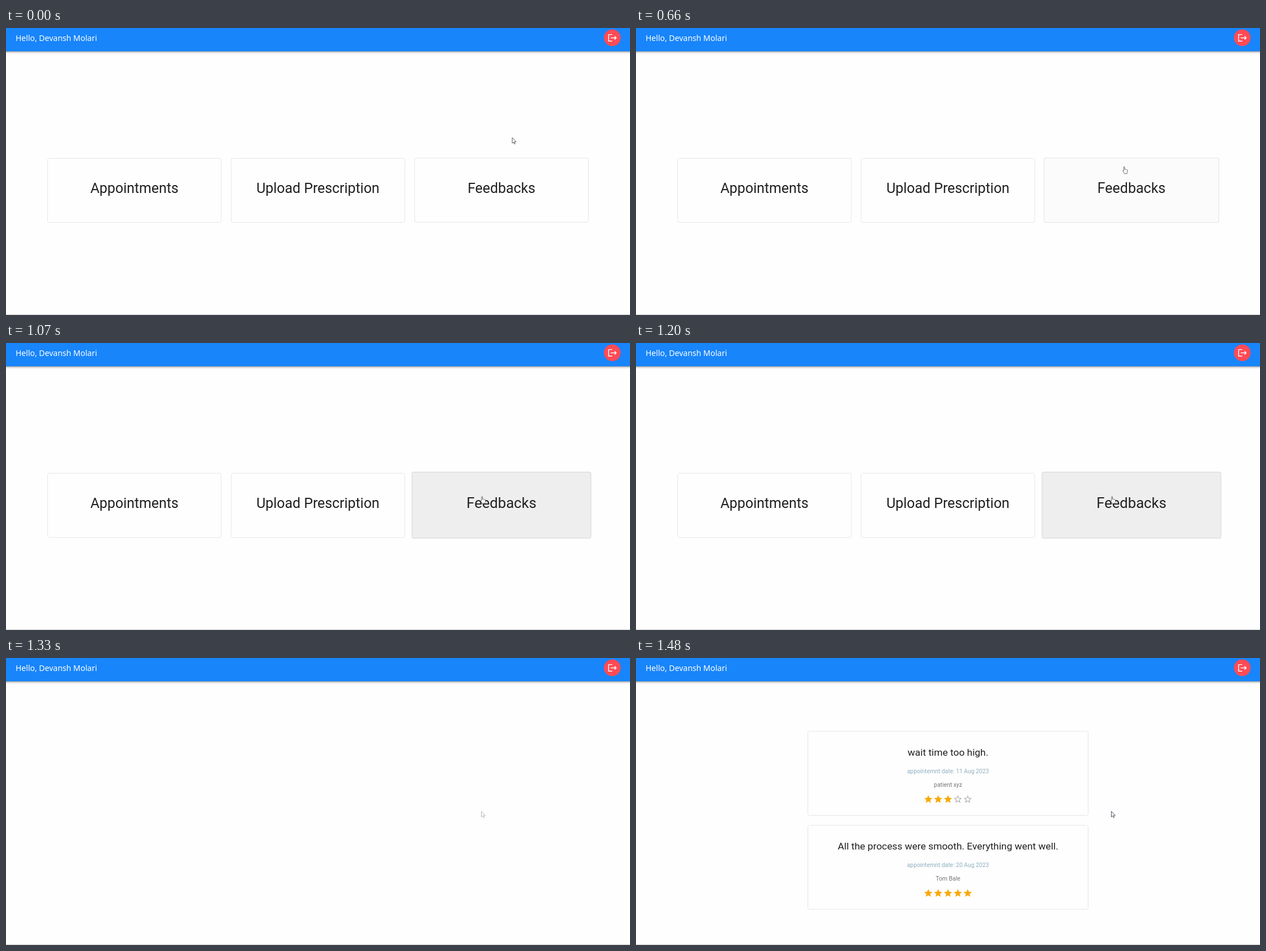
An HTML page that plays this animation: 1102x508 px, repeating every 1.87 s.

```html
<!DOCTYPE html>
<html lang="en">
<head>
<meta charset="utf-8">
<title>Clinic dashboard</title>
<style>
  html, body { margin: 0; width: 100%; height: 100%; overflow: hidden; background: #fefefe; }
  svg { display: block; width: 1102px; height: 508px; }
  text { font-family: Roboto, sans-serif; text-anchor: middle; fill: #212121; }
  .hello { font: 14px "Noto Sans", sans-serif; text-anchor: start; fill: #fff; }
  .tile { font-size: 24.85px; }
  .title { font-size: 17.35px; }
  .date { font-size: 10.35px; fill: #8fafbf; }
  .who { font-size: 10.4px; fill: #757575; }
  .box { fill: #fefefe; stroke: #e6e6e6; }
</style>
</head>
<body>
<svg viewBox="0 0 1102 508" xmlns="http://www.w3.org/2000/svg">
  <defs>
    <linearGradient id="shade" x2="0" y2="1">
      <stop offset="0" stop-color="#000" stop-opacity=".42"/>
      <stop offset=".4" stop-color="#000" stop-opacity=".14"/>
      <stop offset="1" stop-color="#000" stop-opacity="0"/>
    </linearGradient>
    <radialGradient id="veil" gradientUnits="userSpaceOnUse" cx="551" cy="254" r="607">
      <stop offset="0" stop-color="#fff" stop-opacity=".46"/>
      <stop offset="1" stop-color="#b8b8b8" stop-opacity=".27"/>
    </radialGradient>
    <path id="star" d="M12 17.27L18.18 21l-1.64-7.03L22 9.24l-7.19-.61L12 2 9.19 8.63 2 9.24l5.46 4.73L5.82 21z"/>
    <path id="hollow" fill-rule="evenodd" d="M22 9.24l-7.19-.62L12 2 9.19 8.63 2 9.24l5.46 4.73L5.82 21 12 17.27 18.18 21l-1.63-7.03zM12 15.4l-3.76 2.27 1-4.28-3.32-2.88 4.38-.38L12 6.1l1.71 4.04 4.38.38-3.32 2.88 1 4.28z"/>
  </defs>

  <rect width="1102" height="508" fill="#fefefe"/>
  <rect y="41" width="1102" height="5" fill="url(#shade)"/>
  <rect width="1102" height="41.2" fill="#1885fb"/>
  <text class="hello" x="17" y="22.8">Hello, Devansh Molari</text>
  <circle cx="1070.7" cy="17.3" r="14.8" fill="#ff4b55"/>
  <path d="M1070.6 11.6h-6.3v11.6h6.3M1067.8 17.4h9.6M1074.6 14.4l3 3-3 3" fill="none" stroke="#fff" stroke-width="1.45"/>

  <g id="menu"></g>
  <g id="reviews"></g>
  <rect y="507" width="1102" height="1" fill="#c9c9c9"/>
  <g id="loader">
    <rect width="1102" height="508" fill="url(#veil)"/>
    <g id="dots"></g>
  </g>

  <g id="pointer" stroke-width=".85" stroke-linejoin="round">
    <path id="arrow" fill="#fff" d="M0 0V10L2.2 8 3.8 11.4 5.3 10.7 3.8 7.5H6.8Z"/>
    <path id="hand" fill="#f8f8f8" stroke="#555" d="M.4 1.3C.4.1 2.1.1 2.1 1.3V5.1C2.6 4.6 3.6 4.7 3.8 5.5 4.4 5 5.3 5.2 5.5 6 6.2 5.6 7.1 6 7.1 7V9.3C7.1 10.6 6.3 11 6.1 12.8H1.4C1.2 11.3-.7 9.8-1.3 8.3-1.6 7.3-.5 6.9.4 8Z"/>
  </g>
</svg>
<script>
const LOOP = 1870;
const $ = id => document.getElementById(id);

const box = (x, y, w, h) =>
  `<rect class="box" x="${x}" y="${y}" width="${w}" height="${h}" rx="3"/>`;
const label = (kind, x, y, text) =>
  `<text class="${kind}" x="${x}" y="${y}">${text}</text>`;

const tile = (text, i) => {
  const x = 73.5 + 324.1 * i;
  return `<g>${box(x, 230.6, 306.7, 113.6)}${label('tile', x + 153.3, 292.2, text)}</g>`;
};

const review = (y, title, date, who, score) => {
  let html = box(303.5, y, 495, 148.7) +
    label('title', 551, y + 43.1, title) +
    label('date', 551, y + 74.1, 'appointemnt date: ' + date) +
    label('who', 551, y + 97.9, who);
  for (let i = 0; i < 5; i++) {
    const full = i < score;
    html += `<use href="#${full ? 'star' : 'hollow'}" fill="${full ? '#faa807' : '#b0b0b0'}"
      transform="translate(${507.5 + 17.4 * i} ${y + 111.4}) scale(.725)"/>`;
  }
  return html;
};

// Two strands of dots, the second one mirrored
const helix = () => {
  const lift = [-4, 7, 13, 14, 11.5];
  let html = '';
  for (let i = 0; i < 10; i++) {
    const dy = lift[i % 5] * (i < 5 ? 1 : -1);
    const depth = Math.cos(i * Math.PI / 5);
    const dot = (y, r, fill) =>
      `<circle cx="${519.6 + 7 * i}" cy="${y}" r="${r}" fill="${fill}"/>`;
    const front = i === 5 || i === 6 ? '#c9c6c8' : i < 2 ? '#d17f9a' : '#d596ab';
    html += dot(263 + dy, 2.15 + .5 * depth, front) +
      dot(263 - dy, 2.15 - .5 * depth, i < 2 ? '#e4e4e4' : '#dadada');
  }
  return html;
};

$('menu').innerHTML = ['Appointments', 'Upload Prescription', 'Feedbacks'].map(tile).join('');
$('reviews').innerHTML =
  review(129.8, 'wait time too high.', '11 Aug 2023', 'patient xyz', 3) +
  review(296.2, 'All the process were smooth. Everything went well.', '20 Aug 2023', 'Tom Bale', 5);
$('dots').innerHTML = helix();

const target = $('menu').lastElementChild;
const targetBox = target.firstElementChild;

// time, pointer x, pointer y, hover amount
const moves = [
  [0, 894, 194, 0],
  [520, 888, 206, 0],
  [590, 877, 222, 0],
  [660, 861, 245, .2],
  [730, 847, 264, .75],
  [800, 839.5, 271.3, 1]
];
const mix = (a, b, k) => Math.round(a + (b - a) * k);
const grey = v => `rgb(${v},${v},${v})`;
const show = (id, on) => $(id).style.display = on ? '' : 'none';

function draw(t) {
  const [, x, y, hover] = moves.findLast(m => m[0] <= t);
  const onMenu = t < 1330, loading = t >= 1420 && t < 1480;
  const hand = hover > 0 && onMenu;

  show('menu', onMenu);
  show('reviews', t >= 1480);
  show('loader', loading);
  show('hand', hand);
  show('arrow', !hand);

  const s = 1 + .03 * hover;
  target.setAttribute('transform',
    `translate(875 287.1) scale(${s}) translate(-875 -287.4)`);
  targetBox.style.fill = grey(mix(254, 238, hover));
  targetBox.style.stroke = grey(mix(230, 214, hover));

  $('pointer').setAttribute('transform', `translate(${x} ${y})`);
  $('arrow').setAttribute('stroke',
    onMenu ? '#444' : loading ? '#4274b8' : t < 1420 ? '#aaa' : '#33334a');
}

const start = performance.now();
function tick() {
  draw((performance.now() - start) % LOOP);
  requestAnimationFrame(tick);
}
tick();
</script>
</body>
</html>
```
